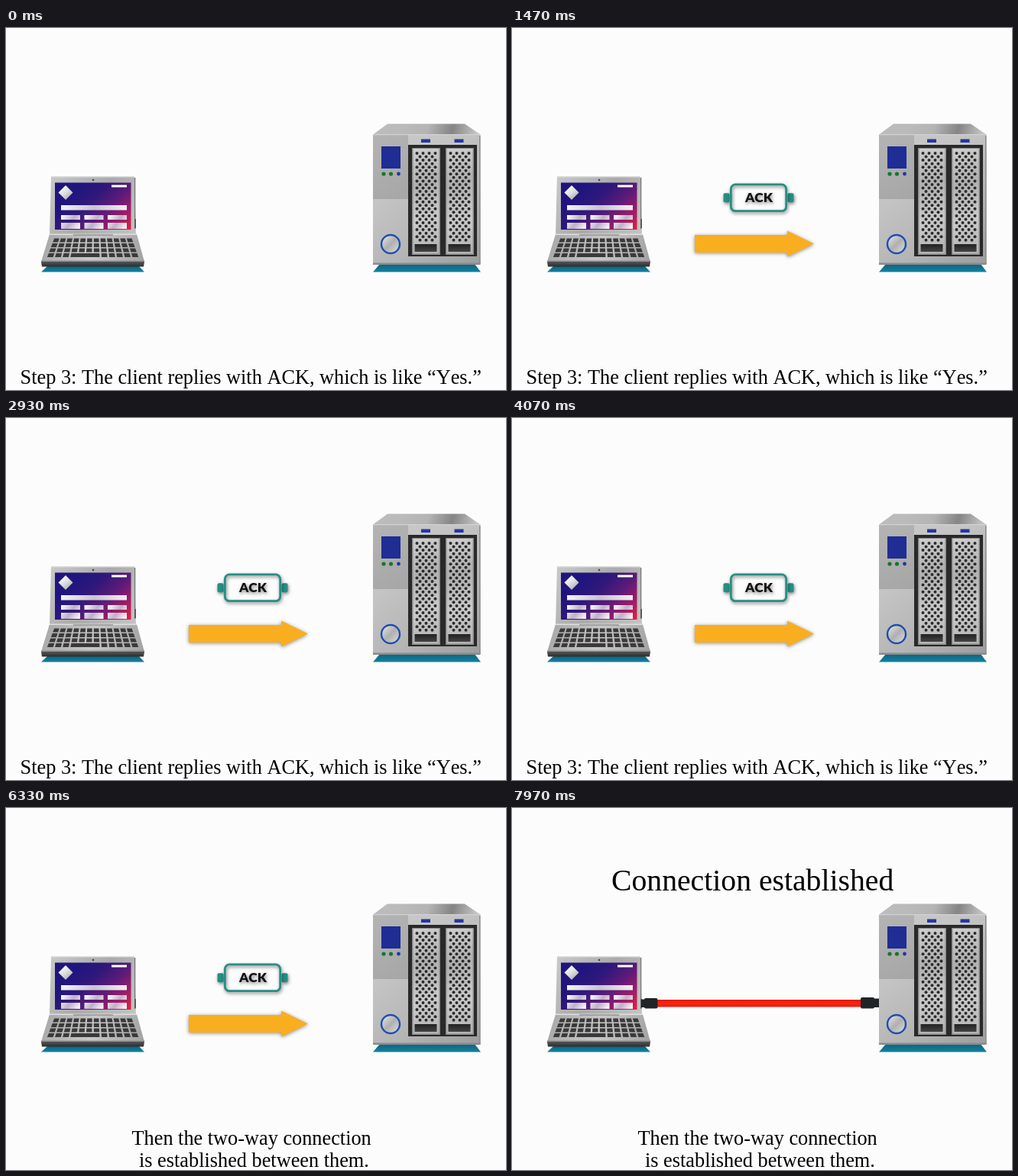
An HTML page with a canvas that plays this animation: 654 px wide and 474 px high, repeating every 8000 ms.

```html
<!DOCTYPE html>
<html lang="en">
<head>
<meta charset="utf-8">
<title>Handshake, step 3</title>
<style>
  html, body { margin: 0; width: 100%; height: 100%; overflow: hidden; background: #fcfcfc; }
  canvas { display: block; width: 654px; height: 474px; }
</style>
</head>
<body>
<canvas id="stage" width="654" height="474"></canvas>
<script>
const W = 654, H = 474, LOOP = 8000;
const ctx = document.getElementById('stage').getContext('2d');
const SERIF = '"Liberation Serif", "Times New Roman", serif';

const clamp = v => Math.max(0, Math.min(1, v));
const span = (t, a, b) => clamp((t - a) / (b - a));
const smooth = u => u * u * (3 - 2 * u);
const easeOut = u => 1 - (1 - u) ** 3;
const mix = (a, b, u) => a + (b - a) * u;

function rect(c, fill, x, y, w, h) {
  c.fillStyle = fill;
  c.fillRect(x, y, w, h);
}

function poly(c, fill, ...p) {
  c.fillStyle = fill;
  c.beginPath();
  for (let i = 0; i < p.length; i += 2) c.lineTo(p[i], p[i + 1]);
  c.closePath();
  c.fill();
}

function disc(c, fill, x, y, r) {
  c.fillStyle = fill;
  c.beginPath();
  c.arc(x, y, r, 0, Math.PI * 2);
  c.fill();
}

function rounded(c, fill, x, y, w, h, r) {
  c.fillStyle = fill;
  c.beginPath();
  c.roundRect(x, y, w, h, r);
  c.fill();
}

// Evenly spaced colour stops between two points.
function grad(c, x0, y0, x1, y1, ...colors) {
  const g = c.createLinearGradient(x0, y0, x1, y1);
  colors.forEach((color, i) => g.addColorStop(i / (colors.length - 1), color));
  return g;
}

function laptop(c) {
  poly(c, grad(c, 0, 312, 0, 320, '#0c6480', '#1284a4'), 54, 312, 174, 312, 181, 319.5, 46, 319.5);

  // lid
  poly(c, grad(c, 57, 195, 170, 270, '#c9c9c9', '#aaaaaa', '#c4c4c4'),
    59, 194, 168, 194, 170, 271, 57, 271);
  rect(c, '#dcdcdc', 59, 194, 109, 1.5);
  rect(c, '#777', 168, 196, 1.3, 67);
  rect(c, '#444', 168.5, 250, 1.3, 12);
  disc(c, '#444', 114, 199, 1.3);

  // screen
  rect(c, grad(c, 80, 190, 160, 275, '#20157f', '#20157f', '#2f187a', '#5c1b78', '#a81c66', '#f5222e'),
    64, 202.5, 99.5, 61.5);
  poly(c, grad(c, 72, 208, 84, 224, '#fff', '#ddd', '#aaa'), 78, 206, 87.5, 215.5, 78, 225, 68.5, 215.5);
  rect(c, '#fff', 138, 205.5, 20, 3);
  rect(c, grad(c, 72, 0, 158, 0, '#f4f4f8', '#c8c4d2', '#f2eef2'), 72, 232, 86, 6.5);
  for (const x of [72, 102.5, 133]) {
    const shine = grad(c, x, 246, x + 25, 263, '#fff', '#bdb0c6', '#fff');
    rect(c, shine, x, 245, 25, 6);
    rect(c, shine, x, 255, 25, 8);
  }

  // keyboard
  poly(c, grad(c, 47, 271, 180, 306, '#a6a6a6', '#c9c9c9', '#a2a2a2'),
    57, 270, 171, 270, 181, 306, 46, 306);
  rect(c, '#e0e0e0', 57, 269.5, 114, 1.5);
  rect(c, '#777', 88, 270.5, 52, 1);
  const left = y => mix(62.5, 52.5, (y - 275) / 26);
  const right = y => mix(165.5, 175, (y - 275) / 26);
  for (let row = 0; row < 4; row++) {
    const y0 = 275.5 + row * 6.5, y1 = y0 + 5;
    for (let k = 0; k < 12; k++) {
      if (row === 3 && k > 3 && k < 7) continue;
      const extra = row === 3 && k === 3 ? 3 : 0;
      const a = (k + 0.1) / 12, b = (k + 0.86 + extra) / 12;
      poly(c, '#3a3a3a',
        mix(left(y0), right(y0), a), y0, mix(left(y0), right(y0), b), y0,
        mix(left(y1), right(y1), b), y1, mix(left(y1), right(y1), a), y1);
    }
  }
  rect(c, '#8d8d8d', 46, 304.5, 135, 2);
  poly(c, grad(c, 0, 306, 0, 313, '#555', '#292929'), 46, 306, 181, 306, 180, 312.5, 47, 312.5);
}

function drive(c, x) {
  rect(c, '#8a8a8a', x, 157, 37, 140);
  rect(c, grad(c, x, 157, x + 37, 297, '#cfcfcf', '#b0b0b0', '#cacaca', '#b0b0b0'), x + 1.5, 158, 34, 137.5);
  for (let row = 0; row < 26; row++) {
    const odd = row % 2;
    for (let col = 0; col < 4 - odd; col++) {
      disc(c, '#2c2c2c', x + 6.5 + col * 8 + odd * 4, 164 + row * 4.55, 2);
    }
  }
  rect(c, grad(c, 0, 283, 0, 293, '#222', '#444'), x + 3.5, 283, 29, 10);
}

function server(c) {
  poly(c, grad(c, 0, 309, 0, 320, '#0c6480', '#1284a4'), 489, 309, 613, 309, 621, 319.5, 480, 319.5);

  poly(c, grad(c, 490, 120, 612, 150, '#bcbcbc', '#bababa', '#b4b4b4', '#858585', '#c4c4c4'),
    499, 125.5, 600, 125.5, 620.5, 139.5, 480, 139.5);
  rect(c, grad(c, 480, 139, 621, 310, '#cacaca', '#c4c4c4', '#b5b5b5', '#9c9c9c'), 480, 139, 140.5, 170);
  rect(c, grad(c, 480, 140, 526, 224, '#b4b4b4', '#a6a6a6'), 480, 139, 46, 85);
  rect(c, '#d2d2d2', 480, 139, 140.5, 1.2);
  rect(c, '#8b8b8b', 480, 307.5, 140.5, 2.5);
  rect(c, '#8d8d8d', 619, 141, 1.5, 168);

  rect(c, '#1f2d94', 491, 155, 25, 29);
  disc(c, '#16762c', 494, 191, 2.6);
  disc(c, '#16762c', 503.5, 191, 2.6);
  disc(c, '#2536a5', 513.5, 191, 2.4);
  disc(c, grad(c, 494, 274, 512, 292, '#ddd', '#b0b0b0', '#d4d4d4'), 503, 283, 12);
  c.strokeStyle = '#1f4daf';
  c.lineWidth = 2.4;
  c.stroke();

  for (const x of [543, 586.5]) rect(c, '#2536a5', x, 145.5, 12, 4.5);
  rect(c, '#292929', 526, 153, 90, 146);
  drive(c, 531);
  drive(c, 575);
}

function cast(blur, x, y, alpha) {
  ctx.shadowColor = `rgba(0,0,0,${alpha})`;
  ctx.shadowBlur = blur;
  ctx.shadowOffsetX = x;
  ctx.shadowOffsetY = y;
}

function arrow(t) {
  const shown = smooth(span(t, 150, 600));
  const alpha = 1 - span(t, 7400, 7520);
  if (!shown || !alpha) return;
  ctx.save();
  ctx.globalAlpha = alpha;
  ctx.beginPath();
  ctx.rect(232, 255, 170 * shown, 55);
  ctx.clip();
  cast(5, 0, 1, 0.45);
  poly(ctx, '#f9ae20', 239, 271, 360, 271, 360, 265.5, 395, 282.5, 360, 299.5, 360, 294, 239, 294);
  ctx.restore();
}

function badge(t) {
  const enter = span(t, 250, 900);
  const alpha = smooth(span(t, 250, 480)) * (1 - span(t, 7320, 7430));
  if (!alpha) return;
  const x = mix(246, 329, easeOut(enter))
    - 6.5 * smooth(span(t, 980, 1200))
    + 102 * smooth(span(t, 6800, 7400));
  const teal = '#258f82';
  ctx.save();
  ctx.globalAlpha = alpha;
  ctx.translate(x, 222.3);
  // the shadow shows only while the badge rests
  if (t > 1200 && t < 6800) cast(4, 1, 2, 0.5);
  rounded(ctx, teal, -46, -6, 8, 12, 2);
  rounded(ctx, teal, 38, -6, 8, 12, 2);
  ctx.strokeStyle = teal;
  ctx.lineWidth = 2.8;
  ctx.beginPath();
  ctx.roundRect(-36.2, -17.4, 72.4, 34.8, 6);
  ctx.stroke();
  ctx.fillStyle = '#111';
  ctx.font = '900 17.4px Lato, "Open Sans", sans-serif';
  ctx.textAlign = 'center';
  ctx.fillText('ACK', 0.5, 6);
  ctx.restore();
}

function cable(t) {
  const shown = smooth(span(t, 7540, 7800));
  if (!shown) return;
  ctx.save();
  ctx.beginPath();
  ctx.rect(168, 240, 313 * shown, 32);
  ctx.clip();
  rect(ctx, grad(ctx, 0, 251, 0, 261, '#d51b10', '#f8230d', '#f8230d', '#cf1a10'), 188, 251, 271, 9.5);
  const black = '#202426';
  rect(ctx, black, 169, 250.5, 8, 10.5);
  rounded(ctx, black, 173, 249, 17.5, 13.5, 2);
  rounded(ctx, black, 456, 248, 18, 14.5, 2);
  rect(ctx, black, 472, 249.5, 8, 11.5);
  ctx.restore();
}

function line(text, x, y, size) {
  ctx.font = `${size}px ${SERIF}`;
  ctx.fillText(text, x, y);
}

function captions(t) {
  ctx.fillStyle = '#000';
  ctx.textAlign = 'left';
  ctx.fontKerning = 'none';
  if (t < 6250) {
    line('Step 3: The client replies with ACK, which is like “Yes.”', 18.6, 465.5, 26.3);
  } else {
    line('Then the two-way connection', 164.5, 441, 26.3);
    line('is established between them.', 174, 469.5, 26.3);
  }
  ctx.globalAlpha = span(t, 7560, 7760);
  line('Connection established', 130, 107.8, 39.7);
  ctx.globalAlpha = 1;
}

// The two machines never change, so they are painted once.
const scene = document.createElement('canvas');
scene.width = W;
scene.height = H;
const sc = scene.getContext('2d');
rect(sc, '#fcfcfc', 0, 0, W, H);
laptop(sc);
server(sc);

function draw(t) {
  ctx.drawImage(scene, 0, 0);
  arrow(t);
  badge(t);
  cable(t);
  captions(t);
}

const start = performance.now();
function tick() {
  draw((performance.now() - start) % LOOP);
  requestAnimationFrame(tick);
}
tick();
</script>
</body>
</html>
```
